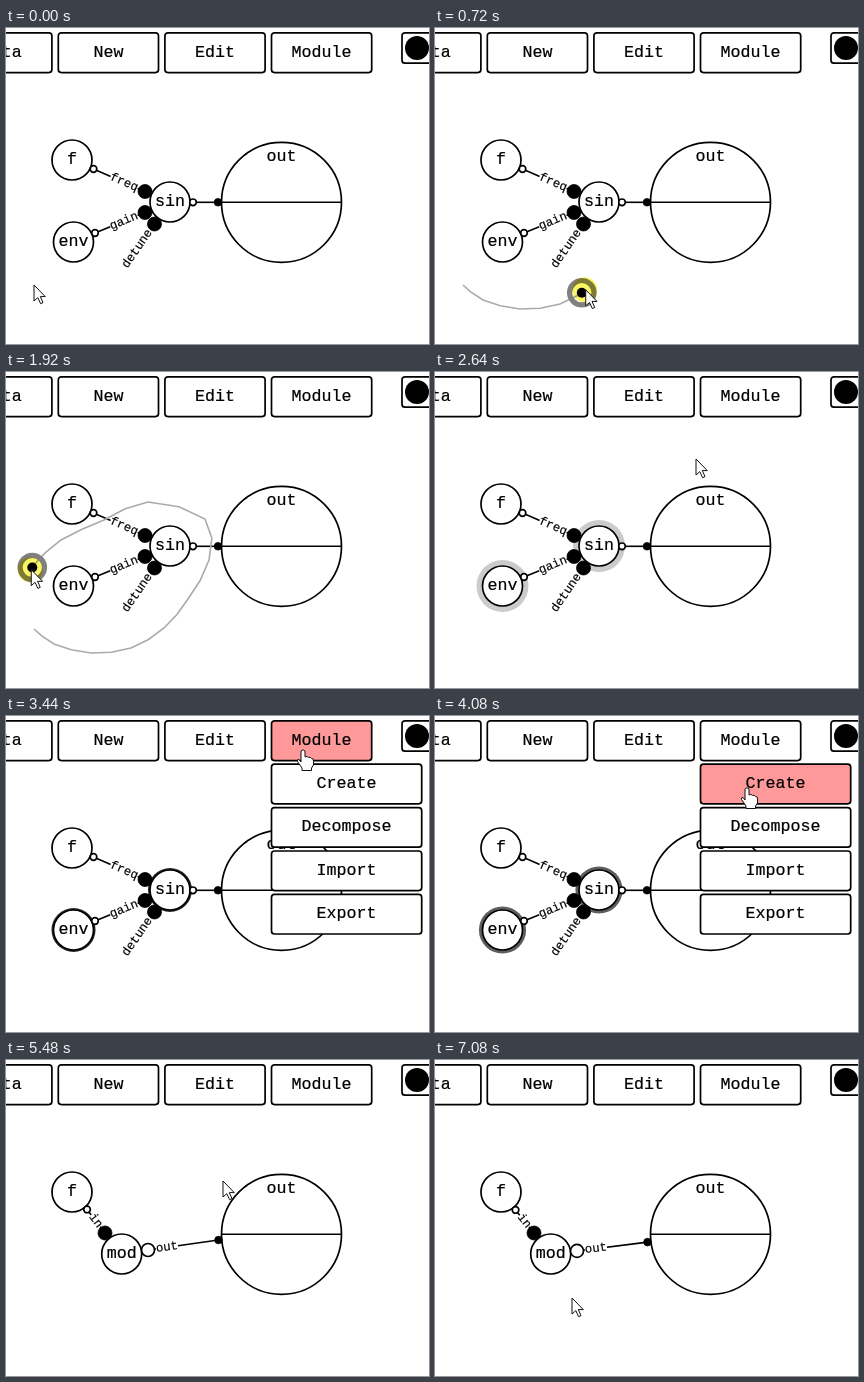
Animation of 423 by 316 pixels, one loop 7.12 s. Source, as an HTML page with a canvas:

```html
<!DOCTYPE html>
<html>
<head>
<meta charset="utf-8">
<style>
html, body { margin: 0; width: 100%; height: 100%; overflow: hidden; background: #fff; }
canvas { display: block; }
</style>
</head>
<body>
<canvas id="stage" width="423" height="316"></canvas>
<script>
const g = document.getElementById('stage').getContext('2d');
const LOOP = 7120, PRESS = 120, RELEASE = 2040, OPEN = 3160, MERGE = 4680;

// Points of the lasso drag, evenly spaced in time
const DRAG = [
  [28, 257], [48, 272], [85, 281], [125, 276], [158, 256], [182, 227], [203, 188],
  [199, 147], [142, 130], [98, 148], [55, 168], [28, 193], [24, 207]
];
// Eased moves after the drag: start, end, x, y
const MOVES = [
  [2260, 2640, 261, 87], [2640, 2860, 297, 34], [3560, 3840, 312, 72],
  [5100, 5480, 217, 121], [5480, 5840, 137, 238]
];

const clamp = (v, lo, hi) => Math.min(hi, Math.max(lo, v));
const mix = (a, b, u) => a + (b - a) * u;

// Catmull-Rom spline through DRAG, u from 0 to 1
function dragAt(u) {
  const last = DRAG.length - 1, s = clamp(u, 0, 1) * last;
  const i = Math.min(Math.floor(s), last - 1), f = s - i;
  const [a, b, c, d] = [-1, 0, 1, 2].map(k => DRAG[clamp(i + k, 0, last)]);
  return [0, 1].map(n => b[n] + f / 2 * (c[n] - a[n] +
    f * (2 * a[n] - 5 * b[n] + 4 * c[n] - d[n] + f * (3 * (b[n] - c[n]) + d[n] - a[n]))));
}

function pointer(t) {
  let [x, y] = dragAt((t - PRESS) / (RELEASE - PRESS));
  for (const [start, end, tx, ty] of MOVES) {
    const u = (1 - Math.cos(Math.PI * clamp((t - start) / (end - start), 0, 1))) / 2;
    x = mix(x, tx, u);
    y = mix(y, ty, u);
  }
  return [x, y];
}

function text(s, x, y, size = 16.67) {
  g.font = size + 'px "Courier New", "Liberation Mono", monospace';
  g.textAlign = 'center';
  g.fillStyle = g.strokeStyle = '#000';
  g.fillText(s, x, y);
  g.lineWidth = size / 80;
  g.strokeText(s, x, y);
}

function paint(fill, width, stroke = '#000') {
  if (fill) { g.fillStyle = fill; g.fill(); }
  if (width) { g.lineWidth = width; g.strokeStyle = stroke; g.stroke(); }
}

function circle(x, y, r, fill = '#fff', width = 1.7, stroke) {
  g.beginPath();
  g.arc(x, y, r, 0, 7);
  paint(fill, width, stroke);
}

const inlet = (x, y, r = 7) => circle(x, y, r, '#000', 0.8);
const outlet = (x, y, r = 3.3) => circle(x, y, r);

function line(x1, y1, x2, y2) {
  g.beginPath();
  g.moveTo(x1, y1);
  g.lineTo(x2, y2);
  paint(null, 1.6);
}

// Label lying along the wire that leaves (x, y) towards (tx, ty)
function label(s, x, y, tx, ty) {
  const a = Math.atan2(ty - y, tx - x), w = s.length * 7.4, d = 8 + w / 2;
  g.save();
  g.translate(x + d * Math.cos(a), y + d * Math.sin(a));
  g.rotate(Math.atan((ty - y) / (tx - x)));
  g.fillStyle = '#fff';
  g.fillRect(-w / 2, -6, w, 12);
  text(s, 0, 3.2, 12.3);
  g.restore();
}

function node(s, x, y, glow = 0) {
  if (glow) {
    const shade = 1 - 0.8 * (glow / 6) ** 1.5;
    circle(x, y, 20 + glow, '#fff', 0);
    circle(x, y, 20 + glow, `rgba(0,0,0,${shade})`, 0);
  }
  circle(x, y, 20);
  text(s, x, y + 4);
}

function button(s, x, y, w, h, p) {
  const hover = p[0] > x && p[0] < x + w && p[1] > y && p[1] < y + h;
  g.beginPath();
  g.roundRect(x, y, w, h, 3);
  paint(hover ? '#f99' : '#fff', 1.7);
  text(s, x + w / 2, y + h / 2 + 4);
  return hover;
}

function separateNodes(t) {
  const wave = ((t - RELEASE) / 1200) % 1;
  const glow = t < RELEASE ? 0 : 6 * (1 - Math.abs(1 - 2 * wave));
  line(87.5, 141, 139, 163.5);
  line(89, 205, 139, 184.5);
  line(187, 174.3, 212, 174.3);
  label('freq', 139, 163.5, 87.5, 141);
  label('gain', 139, 184.5, 89, 205);
  label('detune', 148.5, 196, 132.5, 219);
  node('f', 66, 132);
  node('env', 67.5, 214, glow);
  node('sin', 164, 174, glow);
  outlet(87.5, 141);
  outlet(89, 205);
  outlet(187, 174.3);
  inlet(139, 163.5);
  inlet(139, 184.5);
  inlet(148.5, 196);
  inlet(212, 174.3, 3.8);
}

// Ports of the new module settle exponentially
function mergedNode(t) {
  const k = Math.exp((MERGE - t) / 620);
  const fx = 80.5 + 2 * k, fy = 150 - 2 * k, py = 191 - 3.6 * k, oy = 182.3 - 8.3 * k;
  line(fx, fy, 99, 173);
  line(142, py, 212.5, oy);
  label('in', 99, 173, fx, fy);
  label('out', 142, py, 212.5, oy);
  node('f', 66, 132);
  node('mod', 115.7, 194);
  outlet(fx, fy);
  inlet(99, 173);
  outlet(142, py, 6.5);
  inlet(212.5, oy, 3.8);
}

function lasso(t) {
  const end = Math.max(PRESS, t - 20), [x, y] = pointer(end);
  g.beginPath();
  for (let s = PRESS; s < end; s += 80) g.lineTo(...pointer(s));
  g.lineTo(x, y);
  paint(null, 1.6, '#aaa');
  circle(x, y, 12.2, null, 5.2, '#808080');
  circle(x, y, 5, '#000', 0);
}

const ARROW = new Path2D('M0 0V16L3.8 12.6L6.6 18.7L9 17.6L6.3 11.6H11.3Z');
const HAND = new Path2D('M-2 1Q0 -1.5 2 1V7Q4 5.5 5.5 7.5Q7.5 6.5 8.5 8.5Q10.5 8 10.5 11V15L8.5 18V20.5H-1V18L-5.5 11.5Q-6 9 -4 9.5L-2 12Z');

function cursor([x, y], hand) {
  const shape = hand ? HAND : ARROW;
  g.save();
  g.translate(x, y);
  g.fillStyle = '#fff';
  g.fill(shape);
  g.lineWidth = 1;
  g.strokeStyle = '#111';
  g.stroke(shape);
  g.restore();
}

function draw(t) {
  const p = pointer(t), dragging = t >= PRESS && t < RELEASE;
  g.fillStyle = '#fff';
  g.fillRect(0, 0, 423, 316);

  outlet(275.5, 174.3, 60);
  line(215.5, 174.3, 335.5, 174.3);
  text('out', 275.5, 132.7);
  if (t < MERGE) separateNodes(t);
  else mergedNode(t);
  if (dragging) lasso(t);

  let hand = false;
  ['Data', 'New', 'Edit', 'Module'].forEach((s, i) => {
    hand = button(s, -54.3 + 106.6 * i, 4.8, 100.2, 39.8, p) || hand;
  });
  button('', 396, 4.8, 40, 30.4, p);
  circle(411, 20, 12, '#000', 0);
  if (t >= OPEN && t < MERGE) {
    ['Create', 'Decompose', 'Import', 'Export'].forEach((s, i) => {
      hand = button(s, 265.5, 48.2 + 43.4 * i, 150.2, 39.6, p) || hand;
    });
  }

  const clicking = [OPEN, MERGE].some(c => Math.abs(t - c) < 60);
  if (dragging || clicking) {
    g.globalCompositeOperation = 'multiply';
    circle(p[0] - 1, p[1], 12.5, '#faf566', 0);
    g.globalCompositeOperation = 'source-over';
  }
  cursor(p, hand);
}

function tick() {
  draw(performance.now() % LOOP);
  requestAnimationFrame(tick);
}
tick();
</script>
</body>
</html>
```
